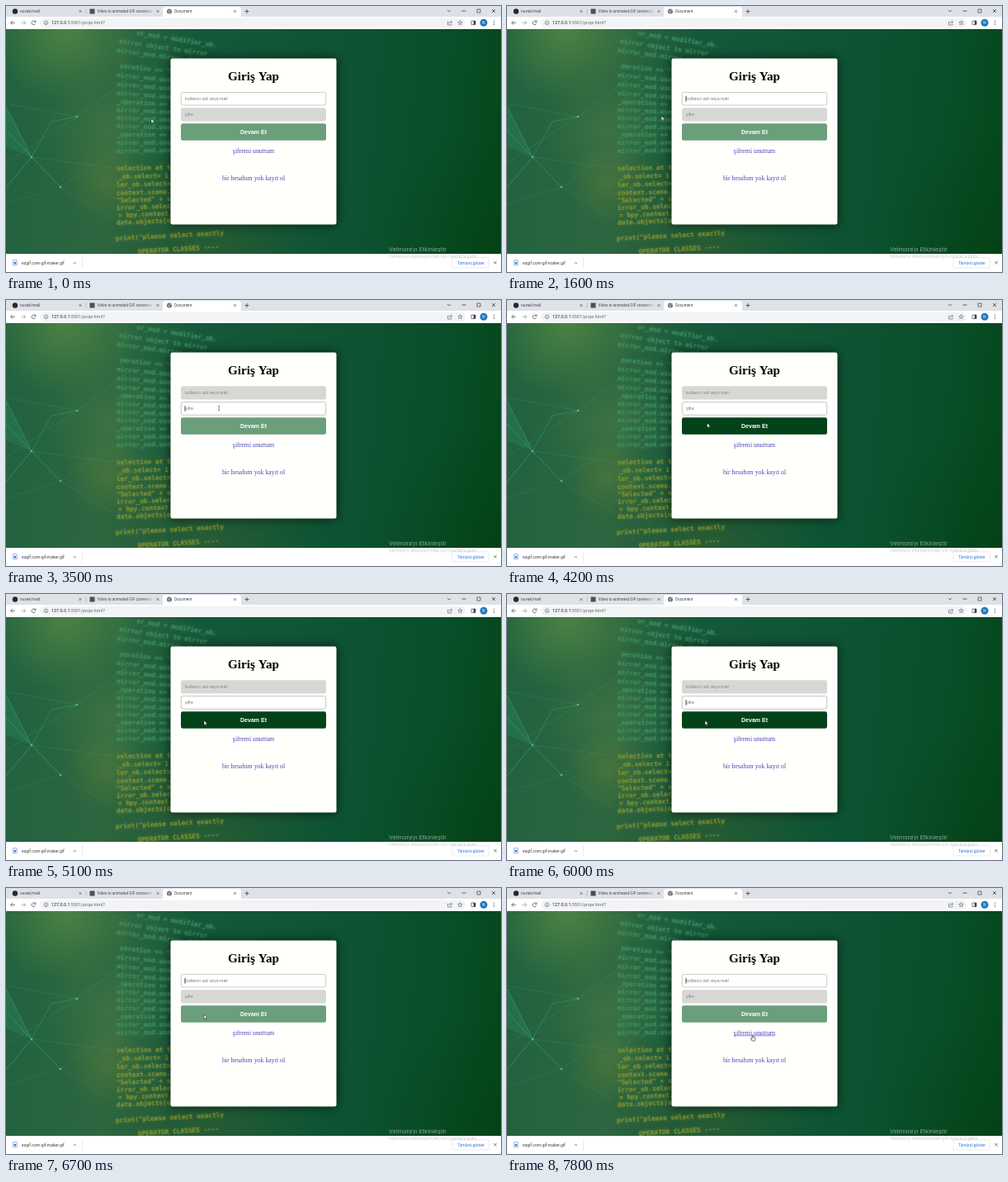
Animation, 600 px wide and 322 px high, one loop 8 s. Source, as an HTML page with a canvas:

```html
<!DOCTYPE html>
<html lang="tr">
<head>
<meta charset="utf-8">
<title>Giriş Yap</title>
<style>
html, body { margin: 0; width: 100%; height: 100%; overflow: hidden; background: #0b4a2d; }
canvas { display: block; width: 600px; height: 322px; }
</style>
</head>
<body>
<canvas id="stage"></canvas>
<script>
const W = 600, H = 322, LOOP = 8000;
const UI = 'Roboto, sans-serif';
const SANS = '"Liberation Sans", Arial, sans-serif';
const SERIF = '"Liberation Serif", "Times New Roman", serif';
const MONO = '"DejaVu Sans Mono", monospace';
const ratio = Math.max(1, window.devicePixelRatio || 1);

function setup(canvas) {
  canvas.width = W * ratio;
  canvas.height = H * ratio;
  const ctx = canvas.getContext('2d');
  ctx.scale(ratio, ratio);
  return ctx;
}

const stage = document.getElementById('stage');
const view = setup(stage);
const backdrop = document.createElement('canvas');
let c = setup(backdrop);

function rect(x, y, w, h, fill) {
  c.fillStyle = fill;
  c.fillRect(x, y, w, h);
}

function box(x, y, w, h, r, fill, stroke, lw = 0.7) {
  c.beginPath();
  c.roundRect(x, y, w, h, r);
  if (fill) { c.fillStyle = fill; c.fill(); }
  if (stroke) { c.strokeStyle = stroke; c.lineWidth = lw; c.stroke(); }
}

function disc(x, y, r, fill) {
  c.beginPath();
  c.arc(x, y, r, 0, Math.PI * 2);
  c.fillStyle = fill;
  c.fill();
}

function line(points, stroke, lw = 0.7) {
  c.beginPath();
  for (let i = 0; i < points.length; i += 2) c.lineTo(points[i], points[i + 1]);
  c.strokeStyle = stroke;
  c.lineWidth = lw;
  c.stroke();
}

function text(str, x, y, size, family, fill, align = 'left', weight = '') {
  c.font = `${weight} ${size}px ${family}`;
  c.textAlign = align;
  c.fillStyle = fill;
  c.fillText(str, x, y);
  return c.measureText(str).width;
}

function cross(x, y, r, color = '#4b4f54') {
  line([x - r, y - r, x + r, y + r], color);
  line([x - r, y + r, x + r, y - r], color);
}

function glow(x, y, r, rgb, alpha) {
  const g = c.createRadialGradient(x, y, 0, x, y, r);
  g.addColorStop(0, `rgba(${rgb},${alpha})`);
  g.addColorStop(1, `rgba(${rgb},0)`);
  rect(0, 28, W, 272, g);
}

// Each code line: baseline, left edge, text
const CODE = [
  [35, 158, 'or_mod = modifier_ob.'],
  [45, 137, 'mirror object to mirror'],
  [56, 134, 'mirror_mod.mirror_object'],
  [75, 138, 'peration == "MIRROR_X":'],
  [86, 134, 'mirror_mod.use_x = True'],
  [97, 134, 'mirror_mod.use_y = False'],
  [108, 134, 'mirror_mod.use_z = False'],
  [118, 134, '_operation == "MIRROR_Y"'],
  [128, 134, 'mirror_mod.use_x = False'],
  [138, 134, 'mirror_mod.use_y = True'],
  [148, 134, 'mirror_mod.use_z = False'],
  [158, 134, '_operation == "MIRROR_Z"'],
  [168, 134, 'mirror_mod.use_x = False'],
  [178, 134, 'mirror_mod.use_y = False'],
  [199, 134, 'selection at the end -add'],
  [209, 136, '_ob.select= 1'],
  [219, 134, 'ler_ob.select=1'],
  [229, 134, 'context.scene.objects'],
  [238, 134, '"Selected" + str(modifi'],
  [247, 134, 'irror_ob.select = 0'],
  [256, 136, '= bpy.context.selected_'],
  [265, 134, 'data.objects[one.name].sel'],
  [284, 133, 'print("please select exactly'],
  [300, 160, 'OPERATOR CLASSES ----']
];

function drawMesh() {
  const teal = 'rgba(58,170,128,.6)', faint = 'rgba(58,170,128,.32)';
  line([0, 122, 31, 183, 66, 219], teal, 0.9);
  line([0, 150, 31, 183, 0, 220], teal, 0.9);
  line([31, 183, 55, 140, 86, 134], teal, 0.7);
  line([0, 118, 86, 134, 150, 86], faint, 0.7);
  line([0, 190, 86, 134], faint, 0.7);
  line([31, 183, 130, 196], faint, 0.7);
  line([66, 219, 130, 258], faint, 0.6);
  line([0, 240, 66, 219, 130, 175], faint, 0.6);
  c.beginPath();
  c.moveTo(0, 122);
  c.lineTo(31, 183);
  c.lineTo(0, 170);
  c.fillStyle = 'rgba(40,150,112,.25)';
  c.fill();
  for (const [x, y] of [[31, 183], [86, 134], [66, 219]]) disc(x, y, 1.3, 'rgba(90,205,160,.8)');
}

function drawPhoto() {
  c.save();
  c.beginPath();
  c.rect(0, 28, W, 272);
  c.clip();
  const base = c.createLinearGradient(0, 140, W, 200);
  base.addColorStop(0, '#23623f');
  base.addColorStop(0.22, '#2c6640');
  base.addColorStop(0.36, '#16583a');
  base.addColorStop(0.7, '#0d5332');
  base.addColorStop(0.88, '#094e28');
  base.addColorStop(1, '#05471b');
  rect(0, 28, W, 272, base);
  glow(72, 28, 90, '110,160,72', 0.5);
  glow(122, 150, 75, '84,132,74', 0.4);
  glow(122, 215, 50, '112,136,52', 0.35);
  glow(240, 300, 140, '66,98,44', 0.4);
  glow(590, 300, 150, '3,62,18', 0.5);
  drawMesh();

  // The lines fan out from the middle height
  c.shadowBlur = 3 * ratio;
  for (const [y, x, str] of CODE) {
    const upper = y < 190;
    c.save();
    c.translate(x, y);
    c.rotate((165 - y) * (upper ? 0.0012 : 0.00045));
    const rgb = upper ? '66,154,100' : '150,158,48';
    c.shadowColor = `rgba(${rgb},.7)`;
    text(str, 0, 0, 7.8, MONO, `rgba(${rgb},.72)`, 'left', 'bold');
    c.restore();
  }
  c.restore();
}

function drawTabs() {
  rect(0, 0, W, 13, '#dee1e6');
  rect(0, 13, W, 15, '#ffffff');
  box(190, 1, 95, 14, [3, 3, 0, 0], '#ffffff');
  line([97, 3.5, 97, 10], '#9a9da2', 0.5);

  disc(11, 6.5, 3.2, '#24292f');
  text('nuvak/mail', 17, 8.3, 4.9, UI, '#44474b');
  rect(101.5, 3.5, 6, 6, '#4b4e52');
  const fade = c.createLinearGradient(168, 0, 179, 0);
  fade.addColorStop(0, '#44474b');
  fade.addColorStop(1, 'rgba(68,71,75,.1)');
  text('Video to animated GIF conversio', 110.5, 8.3, 4.65, UI, fade);
  disc(198, 6.5, 3, '#5f6368');
  line([195.8, 5.5, 198.5, 7, 197.5, 9], '#ffffff', 0.8);
  line([198, 3.8, 199.5, 5.5, 200.8, 5.5], '#ffffff', 0.7);
  text('Document', 204, 8.3, 4.65, UI, '#3c4043');
  for (const x of [90, 184, 277.5]) cross(x, 6.5, 1.4);
  line([289.5, 6.5, 294.5, 6.5], '#3c4043', 0.8);
  line([292, 4, 292, 9], '#3c4043', 0.8);

  line([535, 5, 537, 7, 539, 5], '#3c4043');
  line([552.5, 6, 557.5, 6], '#222');
  box(571, 4, 4, 4, 0, null, '#222', 0.6);
  cross(591, 6, 2, '#222');
}

function drawToolbar() {
  const ink = '#55595e';
  box(41, 14.7, 516, 11.2, 5.6, '#f1f3f4');
  line([11, 20.3, 5.8, 20.3], ink, 0.8);
  line([8.2, 17.8, 5.7, 20.3, 8.2, 22.8], ink, 0.8);
  line([18.5, 20.3, 23.7, 20.3], '#9fa2a6', 0.8);
  line([21.3, 17.8, 23.8, 20.3, 21.3, 22.8], '#9fa2a6', 0.8);
  c.beginPath();
  c.arc(33.5, 20.3, 2.4, 0.5, 5.5);
  c.strokeStyle = ink;
  c.lineWidth = 0.8;
  c.stroke();
  line([36, 17.3, 36, 19.5, 33.8, 19.5], ink, 0.8);
  c.beginPath();
  c.arc(48.5, 20.3, 2.3, 0, 7);
  c.lineWidth = 0.6;
  c.stroke();
  line([48.5, 19.8, 48.5, 21.6], ink, 0.7);
  const w = text('127.0.0.1', 55, 22.3, 5.4, UI, '#202124');
  text(':5501/proje.html?', 55 + w, 22.3, 5.4, UI, '#686c71');

  line([536.5, 19, 535.5, 19, 535.5, 23, 540, 23, 540, 21.5], ink, 0.6);
  line([537, 21.5, 538, 19.3, 540.5, 19.3], ink, 0.6);
  line([539, 17.7, 540.7, 19.3, 539, 20.9], ink, 0.6);
  c.beginPath();
  for (let i = 0; i < 10; i++) {
    const a = i * Math.PI / 5 - Math.PI / 2, r = i % 2 ? 1.2 : 2.8;
    c.lineTo(550.5 + r * Math.cos(a), 20.4 + r * Math.sin(a));
  }
  c.closePath();
  c.lineWidth = 0.6;
  c.stroke();
  box(564, 18, 5, 4.6, 0.4, null, '#3c4043', 0.7);
  rect(566.7, 18, 2.3, 4.6, '#3c4043');
  disc(579, 20.3, 4.5, '#1d78b8');
  text('N', 579, 22, 4.6, UI, '#ffffff', 'center');
  for (const y of [18.2, 20.3, 22.4]) disc(591.5, y, 0.6, ink);
}

function drawShelf() {
  rect(0, 300, W, 22, '#ffffff');
  box(8.5, 307.5, 4.8, 6.4, 0.5, '#e8f0fe', '#6f95d8', 0.6);
  rect(9.7, 310, 2.4, 2.4, '#3d73d0');
  text('ezgif.com-gif-maker.gif', 19, 313, 5.05, UI, '#3c4043');
  line([81.5, 312, 83.3, 310.2, 85.1, 312], '#55595e');
  line([92.5, 304, 92.5, 318], '#d4d6d9', 0.5);
  box(541, 304.7, 44.5, 12.2, 1.5, '#ffffff', '#d5d8dc', 0.5);
  text('Tümünü göster', 563.3, 312.6, 4.87, UI, '#2f70d8', 'center');
  cross(593, 310.7, 1.7);
  text("Velmora'yı Etkinleştir", 464, 297, 7.6, UI, 'rgba(190,205,197,.68)');
  text("Velmora'yı etkinleştirmek için Ayarlar'a gidin.", 464, 305, 5.5, UI, 'rgba(170,178,174,.62)');
}

function drawCard() {
  c.save();
  c.shadowColor = 'rgba(0,0,0,.65)';
  c.shadowBlur = 13 * ratio;
  box(199.5, 63.5, 201, 201, 2.2, '#fffffc');
  c.restore();
  text('Giriş Yap', 300, 90, 15.2, SERIF, '#050505', 'center', 'bold');
  text('bir hesabım yok kayıt ol', 300, 210.7, 7.85, SERIF, '#4a48bd', 'center');
}

drawPhoto();
drawCard();
drawTabs();
drawToolbar();
drawShelf();
c = view;

// Pointer path: time, x, y
const PATH = [
  [1400, 176, 136.5], [2300, 264, 111], [2600, 259, 126], [2900, 258, 131],
  [3800, 258, 131], [4200, 242.5, 149], [4600, 239.5, 152],
  [4900, 239.5, 152], [5100, 240, 153.3], [7200, 240, 153.3], [7800, 298, 178]
];

function pointer(t) {
  let a = PATH[0];
  for (const b of PATH) {
    if (t < b[0]) {
      if (a === b) break;
      const u = (t - a[0]) / (b[0] - a[0]);
      const e = u * u * (3 - 2 * u);
      return [a[1] + (b[1] - a[1]) * e, a[2] + (b[2] - a[2]) * e];
    }
    a = b;
  }
  return [a[1], a[2]];
}

// Times at which the caret toggles, starting hidden
const BLINK = [300, 800, 1300, 1800, 2300, 2900, 3400, 4000, 4500, 5100, 5700, 6200, 6600, 7300, 7800];
const caretOn = t => BLINK.filter(b => b <= t).length % 2 === 1;

function field(y, label, active, border, caret) {
  if (active) box(212.3, y + 0.3, 175.4, 15.6, 2, '#ffffff', border, 0.65);
  else box(212, y, 176, 16.2, 2.2, '#d7d8d4');
  text(label, 217, y + 9.9, 5.25, SANS, active ? '#777977' : '#858784');
  if (active && caret) rect(216.6, y + 4.7, 0.7, 6.8, '#111');
}

function arrow(x, y) {
  c.beginPath();
  for (const [dx, dy] of [[0, 0], [0, 5.4], [1.3, 4.3], [2.2, 6.2], [3.1, 5.8], [2.3, 3.9], [4, 3.8]])
    c.lineTo(x + dx, y + dy);
  c.closePath();
  c.fillStyle = '#ffffff';
  c.fill();
  c.strokeStyle = '#161616';
  c.lineWidth = 0.5;
  c.stroke();
}

function beam(x, y) {
  line([x, y - 2.6, x, y + 2.6], '#333', 0.6);
  for (const d of [-2.6, 2.6]) line([x - 1.1, y + d, x + 1.1, y + d], '#333', 0.5);
}

function hand(x, y) {
  c.beginPath();
  for (const [dx, dy] of [[-0.8, 0], [0.3, 0], [0.4, 2.3], [3, 2.9], [3, 5], [2.2, 7], [-1, 7], [-2.8, 4.2], [-2.1, 3.7], [-0.8, 4.6]])
    c.lineTo(x + dx, y + dy);
  c.closePath();
  c.fillStyle = '#ffffff';
  c.fill();
  c.strokeStyle = '#222';
  c.lineWidth = 0.6;
  c.stroke();
}

function frame(now) {
  const t = now % LOOP;
  const [x, y] = pointer(t);
  const onPass = t >= 3400 && t < 6600;
  const dark = t >= 4000 && t < 6600;
  const caret = caretOn(t);
  const onLink = x > 275 && x < 325 && y > 170;

  c.drawImage(backdrop, 0, 0, W, H);
  field(104.2, 'kullanıcı adı veya mail', !onPass, '#a3b8ae', caret);
  field(123.3, 'şifre', onPass, '#a3a8a4', caret);
  box(212, 142.2, 176, 20.6, 2.2, dark ? '#04421a' : '#6b9f7b');
  text('Devam Et', 300, 155, 7.02, SANS, '#ffffff', 'center', 'bold');
  const w = text('şifremi unuttum', 300, 177.6, 7.85, SERIF, '#4a48bd', 'center');
  if (onLink) rect(300 - w / 2, 178.6, w, 0.6, '#4a48bd');

  if (onLink) hand(x, y);
  else if (x > 212 && y > 104 && y < 139.5) beam(x, y);
  else arrow(x, y);
  requestAnimationFrame(frame);
}
requestAnimationFrame(frame);
</script>
</body>
</html>
```
